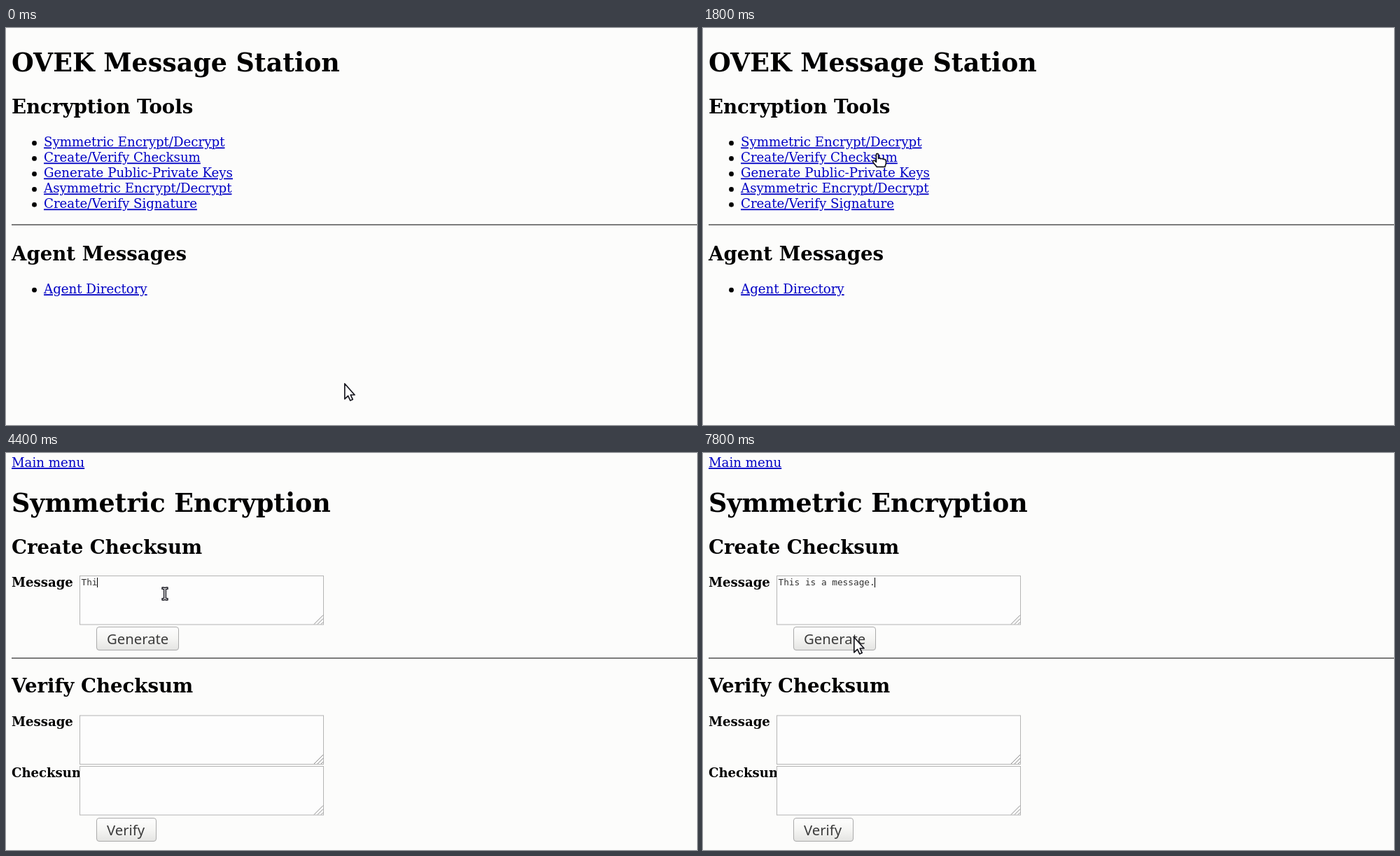
An HTML page that plays this animation: 987 px wide and 567 px high, repeating every 8000 ms.

```html
<!DOCTYPE html>
<html lang="en">
<head>
<meta charset="utf-8">
<title>Checksum demo</title>
<style>
  html, body { margin: 0; width: 100%; height: 100%; overflow: hidden; background: #fcfcfb; }
  svg { display: block; width: 987px; height: 567px; }
  text { font: 18.2px "DejaVu Serif", serif; fill: #000; white-space: pre; }
  .title { font-size: 36.4px; font-weight: bold; }
  .heading { font-size: 27.6px; font-weight: bold; }
  .label { font-size: 18.1px; font-weight: bold; }
  .link { fill: #0000c4; text-decoration: underline; }
  .caption { font: 20.3px "Noto Sans", "Open Sans", sans-serif; fill: #3c3c3c; }
  .typed { font: 12.75px "DejaVu Sans Mono", monospace; fill: #333; }
  .rule { fill: #7c7c7c; }
  .field { fill: #fdfdfd; stroke: #b4b4b4; }
  .grip { fill: none; stroke: #8c8c8c; }
  .button { fill: url(#face); stroke: #aaa; }
  .pointer { fill: #fff; stroke: #16161e; stroke-width: 1.7; stroke-linejoin: round; }
</style>
</head>
<body>
<svg viewBox="0 0 987 567">
  <defs>
    <linearGradient id="face" x2="0" y2="1">
      <stop offset="0" stop-color="#fefefe"/>
      <stop offset=".5" stop-color="#f5f5f3"/>
      <stop offset="1" stop-color="#e4e4e2"/>
    </linearGradient>
  </defs>
  <g id="menu"></g>
  <g id="form"></g>
  <g id="entry">
    <text id="typed" class="typed" x="107.5" y="189"></text>
    <rect id="caret" y="178" width="1" height="14"/>
  </g>
  <g id="cursor" class="pointer">
    <path id="arrow" d="M.8 0V21.8L5.6 17.4 8.7 24 12.2 22.4 9.2 16H15Z"/>
    <path id="hand" d="M-4.6 6.5V-2Q-4.5-3.6-3.1-3.6T-1.4-2V3.4Q.6 2.4 2 3.8 4 3 5.4 4.4 9.4 4 9.4 7.4V10.4L7.8 15.4H-3.6L-9 9Q-10 6.8-8 6.2-6.4 6-4.6 8.4Z"/>
    <path id="beam" stroke-width="1.4" d="M-4-9H-1L0-8.3 1-9H4V-6.6H1.4V6.6H4V9H1L0 8.3-1 9H-4V6.6H-1.4V-6.6H-4Z"/>
  </g>
</svg>
<script>
const el = id => document.getElementById(id);
const text = (kind, x, y, words) => `<text class="${kind}" x="${x}" y="${y}">${words}</text>`;
const rule = y => `<rect class="rule" x="8" y="${y}" width="979" height="2"/>`;
const bullet = (y, words) => `<circle cx="40.5" cy="${y - 5}" r="3.4"/>` + text("link", 54, y, words);
const field = y => `<rect class="field" x="105.5" y="${y}" width="348" height="69.5"/>
  <path class="grip" d="M440 ${y + 69}l13-13M445 ${y + 69}l8-8M450 ${y + 69}l3-3"/>`;
const button = (y, width, words) =>
  `<rect class="button" x="129.5" y="${y}" width="${width}" height="33" rx="3.5"/>` +
  text("caption", 144, y + 24.5, words);

const tools = ["Symmetric Encrypt/Decrypt", "Create/Verify Checksum", "Generate Public-Private Keys",
  "Asymmetric Encrypt/Decrypt", "Create/Verify Signature"];

el("menu").innerHTML = text("title", 8, 62, "OVEK Message Station") +
  text("heading", 8, 122, "Encryption Tools") +
  tools.map((name, i) => bullet(169.4 + 22 * i, name)).join("") + rule(280) +
  text("heading", 8, 332, "Agent Messages") + bullet(379.2, "Agent Directory");

el("form").innerHTML = text("link", 8, 20, "Main menu") +
  text("title", 8, 84, "Symmetric Encryption") +
  text("heading", 8, 144, "Create Checksum") +
  text("label", 8, 191, "Message") + field(175.5) + button(248.5, 117, "Generate") + rule(292) +
  text("heading", 8, 342, "Verify Checksum") +
  text("label", 8, 390, "Message") + field(375) +
  text("label", 8, 463, "Checksum") + field(447.5) + button(521.5, 85, "Verify");

const message = "This is a message.";
const charWidth = 7.675;
// Pointer hot spot: time, x, y
const path = [[0, 483, 508], [1000, 469, 176], [1200, 461, 178], [1800, 252, 183], [2600, 252, 183],
  [3400, 227, 201], [6400, 227, 201], [7600, 215, 263], [8000, 215, 263]];

function pointerAt(t) {
  const i = path.findIndex(p => p[0] > t);
  const [t0, x0, y0] = path[i - 1], [t1, x1, y1] = path[i];
  const u = (t - t0) / (t1 - t0), k = u * u * (3 - 2 * u);
  return [x0 + (x1 - x0) * k, y0 + (y1 - y0) * k];
}

const show = (id, on) => el(id).setAttribute("display", on ? "inline" : "none");

function draw(now) {
  const t = Math.floor(now % 8000 / 200) * 200;
  const onForm = t >= 2600;
  const [x, y] = pointerAt(t);
  const shape = onForm ? (y < 246 ? "beam" : "arrow") : (x < 278 ? "hand" : "arrow");
  show("menu", !onForm);
  show("form", onForm);
  show("entry", onForm);
  for (const id of ["arrow", "hand", "beam"]) show(id, id === shape);
  el("cursor").setAttribute("transform", `translate(${Math.round(x)} ${Math.round(y)})`);

  const count = Math.max(0, Math.min(message.length, Math.floor((t - 4000) / 1000 * 8.5)));
  el("typed").textContent = message.slice(0, count);
  el("caret").setAttribute("x", Math.round(107 + count * charWidth));
  const typing = t >= 4200 && t < 6200;
  const blinkStart = t < 4200 ? 3400 : 6200;
  show("caret", typing || t >= blinkStart && (t - blinkStart) % 1200 < 600);
  requestAnimationFrame(draw);
}
requestAnimationFrame(draw);
</script>
</body>
</html>
```
